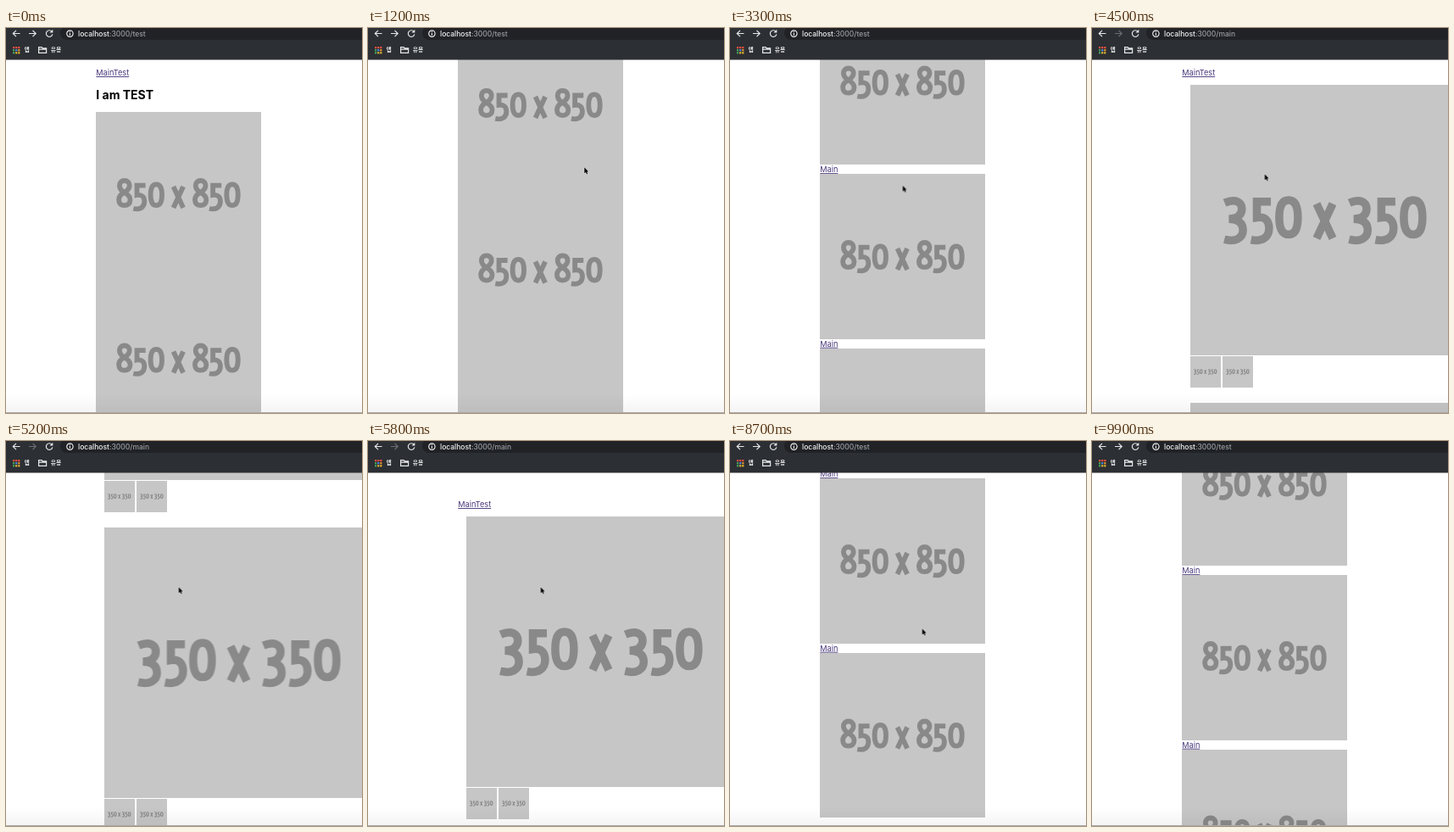
Write an HTML page that moves like this. It is 420 px wide and 454 px high and loops after 10000 ms.

```html
<!DOCTYPE html>
<html lang="ko">
<head>
<meta charset="utf-8">
<title>localhost:3000/test</title>
<style>
  html, body { margin: 0; width: 100%; height: 100%; overflow: hidden; background: #fff; }
  svg { display: block; }
  text { font-family: Inter, Roboto, sans-serif; }
  .link { font-size: 9.2px; fill: #48377a; text-decoration: underline; }
  .title { font-size: 14px; font-weight: 700; fill: #000; }
  .url { font-size: 8.5px; font-weight: 500; fill: #9a9da2; }
  .url tspan { fill: #f3f4f5; }
  .mark { font: 700 6.8px "Noto Sans CJK KR", "Noto Sans CJK", sans-serif; fill: #eee; }
  .icon { fill: none; stroke: #e6e7e8; stroke-width: 1.2; }
  .dim { stroke: #6c6e72; }
  .tile { fill: #c6c6c6; shape-rendering: crispEdges; }
  .glyphs { fill: none; stroke: #898989; stroke-width: 5.8; }

  /* One percent is one 100 ms tick; steps() counts ticks per move. */
  .on-test, .on-main, #testScroll, #mainScroll, #cursor {
    animation: 10s step-end infinite;
  }
  .on-test { animation-name: showTest; }
  .on-main { animation-name: showMain; }
  #testScroll { animation-name: testScroll; }
  #mainScroll { animation-name: mainScroll; }
  #cursor { animation-name: point; }

  @keyframes showTest {
    0%, 70% { visibility: visible; }
    41% { visibility: hidden; }
    100% { visibility: visible; }
  }
  @keyframes showMain {
    0%, 70% { visibility: hidden; }
    41% { visibility: visible; }
    100% { visibility: hidden; }
  }
  @keyframes testScroll {
    0% { transform: translateY(0); }
    9% { transform: translateY(0); animation-timing-function: steps(11); }
    20% { transform: translateY(-389px); animation-timing-function: steps(5); }
    25% { transform: translateY(-840px); animation-timing-function: steps(5); }
    30%, 81% { transform: translateY(-1105px); }
    82% { transform: translateY(-1105px); animation-timing-function: steps(5); }
    87% { transform: translateY(-1644px); }
    88% { transform: translateY(-1600px); animation-timing-function: steps(3); }
    91%, 100% { transform: translateY(-1324.5px); }
  }
  @keyframes mainScroll {
    0% { transform: translateY(0); }
    46% { transform: translateY(0); animation-timing-function: steps(4); }
    50% { transform: translateY(-280px); animation-timing-function: steps(4); }
    54% { transform: translateY(-400px); }
    56% { transform: translateY(-210px); }
    57% { transform: translateY(-45px); }
    58% { transform: translateY(22px); animation-timing-function: steps(3); }
    61%, 100% { transform: translateY(0); }
  }
  @keyframes point {
    0% { transform: translate(389px, 245px); visibility: hidden; }
    1% { transform: translate(380px, 234px); visibility: visible; animation-timing-function: steps(2); }
    3% { transform: translate(290px, 138px); }
    5% { transform: translate(290px, 138px); animation-timing-function: steps(7); }
    12% { transform: translate(255px, 164px); }
    27% { transform: translate(255px, 164px); animation-timing-function: steps(3); }
    30% { transform: translate(212px, 182px); }
    31% { transform: translate(212px, 182px); animation-timing-function: steps(2); }
    33% { transform: translate(203.5px, 185.5px); animation-timing-function: steps(6); }
    39% { transform: translate(118px, 165px); }
    42% { transform: translate(118px, 165px); animation-timing-function: steps(3); }
    45% { transform: translate(203.5px, 172px); }
    61% { transform: translate(203.5px, 172px); animation-timing-function: steps(5); }
    66% { transform: translate(37px, 7px); animation-timing-function: steps(3); }
    69% { transform: translate(11px, 5px); }
    76% { transform: translate(11px, 5px); animation-timing-function: steps(6); }
    82% { transform: translate(226.5px, 221px); }
    92% { transform: translate(226.5px, 221px); animation-timing-function: steps(3); }
    95% { transform: translate(50px, 5px); animation-timing-function: steps(3); }
    98% { transform: translate(362px, 160px); visibility: visible; }
    99%, 100% { transform: translate(389px, 245px); visibility: hidden; }
  }
</style>
</head>
<body>
<svg width="420" height="454" viewBox="0 0 420 454">
  <defs>
    <linearGradient id="shade" x2="0" y2="1">
      <stop offset="0" stop-color="#000" stop-opacity="0"/>
      <stop offset="1" stop-color="#000" stop-opacity=".04"/>
    </linearGradient>
    <path id="d0" d="M9.5-27.6C14-27.6 16.2-23.4 16.2-15.2S14-2.8 9.5-2.8 2.8-7 2.8-15.2 5-27.6 9.5-27.6Z"/>
    <path id="d3" d="M1-25.6C8.6-28.8 13.4-26.4 13.4-21.2C13.4-16.6 10-14 4-14C10.8-14 14.2-11 14.2-6C14.2 0 8.6 2.6 .8 .8"/>
    <path id="d5" d="M15.5-26.4H5.4V-15C11.6-16 14.2-12.4 14.2-7.4C14.2-.6 9 2.6 1.2 1"/>
    <path id="d8" d="M9.5-18C4.6-20.6 3.6-23.6 3.6-26.2C3.6-29.8 6-32 9.5-32S15.4-29.8 15.4-26.2C15.4-23 13.5-20.5 9.3-18.2C4.5-15.6 2.8-13 2.8-9.5C2.8-5 5.5-2.8 9.5-2.8S16.2-5 16.2-9.5C16.2-14 13-16 9.5-18Z"/>
    <path id="dx" d="M2.6-25L14.2 0M14.2-25L2.6 0"/>
  </defs>

  <g class="on-test"><g id="testScroll"></g></g>
  <g class="on-main"><g id="mainScroll"></g></g>

  <rect y="432" width="420" height="21" fill="url(#shade)"/>
  <rect y="453" width="420" height="1" fill="#aaa"/>

  <g id="toolbar">
    <rect width="420" height="37.5" fill="#2c2f34"/>
    <path d="M420-2H72a8 8 0 0 0 0 16H420Z" fill="#202226"/>
    <path class="icon" d="M16.5 6.5H8.5M12 2.8L8.3 6.5L12 10.2"/>
    <path class="icon on-test" d="M27 6.5H35M31.5 2.8L35.2 6.5L31.5 10.2"/>
    <path class="icon dim on-main" d="M27 6.5H35M31.5 2.8L35.2 6.5L31.5 10.2"/>
    <path class="icon" d="M54.2 4.2A3.8 3.8 0 1 0 54.9 7.4"/>
    <path d="M55.3 1.8V5.6H51.5Z" fill="#e6e7e8"/>
    <circle class="icon" cx="75.4" cy="6.6" r="3.7"/>
    <path class="icon" d="M75.4 6.1V8.8M75.4 4.2V5.3"/>
    <text class="url on-test" x="85" y="9.7"><tspan>localhost</tspan>:3000/test</text>
    <text class="url on-main" x="85" y="9.7"><tspan>localhost</tspan>:3000/main</text>
    <g id="apps"></g>
    <text class="mark" x="21.5" y="28.3">앱</text>
    <path class="icon" d="M38.6 29.4V22.6H42.2L43.2 23.8H47.6V29.4ZM38.6 25.2H47.6"/>
    <text class="mark" x="52.7" y="28.3">유용</text>
  </g>

  <g id="cursor">
    <path d="M.3 .3V7.4L1.9 5.9L3.1 8.6L4.2 8.1L3.1 5.5H5.2Z" fill="#000" stroke="#fff" stroke-width=".8" paint-order="stroke"/>
  </g>
</svg>
<script>
  const SIDE = 194.5, LEFT = 106.3, ROW = 11;
  const byId = id => document.getElementById(id);
  const slots = [24, 42.8, 61.5, 88.6, 113.8, 132.4, 151.2];

  // Placeholder picture, drawn on a 194.5 unit square.
  function picture(x, y, size, label) {
    const base = label[0] === '8' ? 113 : 110.5;
    const glyphs = [...label.replaceAll(' ', '')]
      .map((c, i) => `<use href="#d${c}" x="${slots[i]}" y="${base}"/>`).join('');
    return `<g transform="translate(${x} ${y}) scale(${size / SIDE})" role="img" aria-label="${label}">
      <rect class="tile" width="${SIDE}" height="${SIDE}"/>
      <g class="glyphs">${glyphs}</g></g>`;
  }
  const link = (y, label) => `<text class="link" x="${LEFT}" y="${y}">${label}</text>`;

  let test = link(56, 'MainTest') + `<text class="title" x="${LEFT}" y="84">I am TEST</text>`;
  let y = 99;
  for (let i = 0; i < 6; i++, y += SIDE) test += picture(LEFT, y, SIDE, '850 x 850');
  for (let i = 0; i < 4; i++, y += SIDE + ROW) {
    test += link(y + 9.2, 'Main') + picture(LEFT, y + ROW, SIDE, '850 x 850');
  }
  byId('testScroll').innerHTML = test;

  let main = link(56, 'MainTest');
  for (let i = 0; i < 4; i++) {
    const top = 67 + i * 375;
    main += picture(115.5, top, 318.8, '350 x 350');
    for (const x of [115.5, 153.7]) main += picture(x, top + 320.2, 36.4, '350 x 350');
  }
  byId('mainScroll').innerHTML = main;

  const dots = ['#e8503f', '#e8503f', '#e8503f', '#46a35a', '#4a86e8', '#e59a2e', '#46a35a', '#e5b52e', '#e5b52e'];
  byId('apps').innerHTML = dots.map((c, i) =>
    `<rect x="${8 + i % 3 * 3.1}" y="${22 + Math.floor(i / 3) * 3.1}" width="2.2" height="2.2" fill="${c}"/>`).join('');
</script>
</body>
</html>
```
